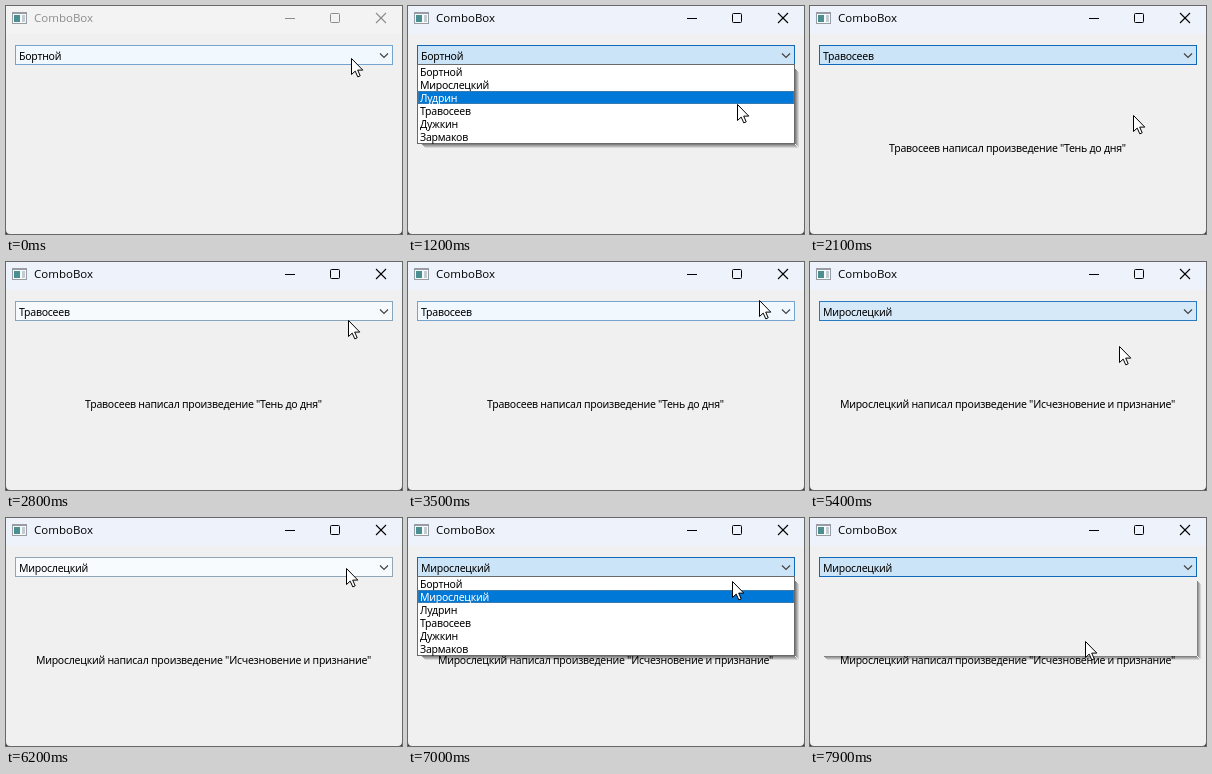
Write an HTML page with a canvas that moves like this. It is 396 by 228 pixels and loops after 8000 ms.

```html
<!DOCTYPE html>
<html lang="ru">
<head>
<meta charset="utf-8">
<title>ComboBox</title>
<style>
html, body { margin: 0; width: 100%; height: 100%; overflow: hidden; background: #f0f0f0; }
canvas { display: block; width: 396px; height: 228px; }
</style>
</head>
<body>
<canvas id="stage" width="396" height="228"></canvas>
<script>
const ctx = document.getElementById('stage').getContext('2d');
const W = 396, H = 228, LOOP = 8000, STEP = 100;
const UI_FONT = '10.5px "Noto Sans", "Open Sans", sans-serif';
const TITLE_FONT = '11.5px "Open Sans", "Noto Sans", sans-serif';
const ROW = 13, LIST_TOP = 59;
const BODY = '#f0f0f0';

const authors = ['Бортной', 'Мирослецкий', 'Лудрин', 'Травосеев', 'Дужкин', 'Зармаков'];
const works = { 1: 'Исчезновение и признание', 3: 'Тень до дня' };

// each use of the box: pressed, list closed, chosen row
const uses = [
  { press: -2000, pick: -1400, row: 0 },
  { press: 400, pick: 2100, row: 3 },
  { press: 4400, pick: 5100, row: 1 },
  { press: 6400, pick: 7900, row: 1 }
];

// time, x, y where the pointer turns or rests
const turns = [
  [0, 345, 52], [500, 349, 56], [1500, 323, 109], [2300, 323, 109], [2900, 344, 54],
  [3600, 351, 37], [4400, 349, 44], [4900, 309, 84], [5400, 309, 84], [6100, 340, 50],
  [6400, 340, 50], [6700, 338, 17], [7000, 324, 63], [7700, 275, 123]
];

// normal, hovered, pressed
const fills = [[253, 253, 253], [239, 247, 254], [204, 228, 247]];
const edges = [[165, 165, 165], [106, 164, 214], [15, 104, 184]];

const clamp = u => Math.min(1, Math.max(0, u));
const smooth = u => u * u * (3 - 2 * u);
const mix = (a, b, u) => a + (b - a) * u;

function pointerAt(t) {
  const next = turns.findIndex(([time]) => time > t);
  if (next < 1) return turns[next < 0 ? turns.length - 1 : 0].slice(1);
  const [t0, x0, y0] = turns[next - 1], [t1, x1, y1] = turns[next];
  const u = smooth((t - t0) / (t1 - t0));
  return [mix(x0, x1, u), mix(y0, y1, u)];
}

// 0 normal, 1 hovered, 2 pressed
function comboLevel(t, { press, pick }) {
  const since = t - pick;
  if (since < 0) return 1 + clamp((t - press) / 200);
  const released = 2 * (1 - clamp(since / 800) ** 2);
  return Math.max(released, clamp((since - 900) / 600));
}

function shade(stops, level) {
  const i = Math.min(Math.floor(level), stops.length - 2);
  return `rgb(${stops[i].map((v, c) => Math.round(mix(v, stops[i + 1][c], level - i)))})`;
}

function rect(color, x, y, w, h) {
  ctx.fillStyle = color;
  ctx.fillRect(x, y, w, h);
}

function frame(color, x, y, w, h) {
  ctx.strokeStyle = color;
  ctx.lineWidth = 1;
  ctx.strokeRect(x + 0.5, y + 0.5, w - 1, h - 1);
}

function line(color, width, ...points) {
  ctx.strokeStyle = color;
  ctx.lineWidth = width;
  ctx.beginPath();
  points.forEach(([x, y]) => ctx.lineTo(x, y));
  ctx.stroke();
}

function text(str, x, y, color = '#000', align = 'left', font = UI_FONT) {
  ctx.font = font;
  ctx.letterSpacing = font === UI_FONT ? '-0.25px' : '0px';
  ctx.textAlign = align;
  ctx.fillStyle = color;
  ctx.fillText(str, x, y);
}

function drawWindow(active) {
  const ink = active ? '#000' : '#8c8c8c';
  rect(BODY, 0, 0, W, H);
  rect(active ? '#eef3fb' : '#f3f3f3', 0, 0, W, 28);

  rect('#979da2', 6, 6, 15, 12);
  rect('#f7f8f8', 7, 8, 13, 9);
  rect('#4b8f93', 8, 9, 6, 7);
  rect('#c3ccd2', 16, 9, 3, 7);

  text('ComboBox', 28, 16, ink, 'left', TITLE_FONT);
  line(ink, 1, [279, 12.5], [289, 12.5]);
  ctx.beginPath();
  ctx.roundRect(324.5, 7.5, 9, 9, 1);
  ctx.stroke();
  line(ink, 1.1, [370, 7], [380, 17]);
  line(ink, 1.1, [380, 7], [370, 17]);
}

function drawCombo(level, name) {
  rect(shade(fills, level), 9, 39, 378, 20);
  frame(shade(edges, level), 9, 39, 378, 20);
  text(name, 13, 54);
  line('#444', 1.2, [374, 47.5], [378, 51.5], [382, 47.5]);
}

function drawShadow() {
  for (let i = 0; i < 4; i++) {
    const color = `rgba(0,0,0,${0.46 * (1 - i / 4)})`;
    rect(color, 387 + i, 63 + i, 1, 75);
    rect(color, 14 + i, 138 + i, 373, 1);
  }
}

function drawList(hovered) {
  drawShadow();
  rect('#fff', 9, 58, 378, 80);
  frame('#6a6a6a', 9, 58, 378, 80);
  authors.forEach((name, i) => {
    const top = LIST_TOP + ROW * i;
    if (i === hovered) {
      rect('#0078d7', 10, top, 376, ROW);
      ctx.setLineDash([1, 1]);
      frame('rgba(255,135,40,.45)', 10, top, 376, ROW);
      ctx.setLineDash([]);
    }
    text(name, 12, top + 11, i === hovered ? '#fff' : '#000');
  });
}

function drawPointer([x, y]) {
  ctx.save();
  ctx.translate(Math.round(x) + 0.5, Math.round(y) + 0.5);
  const arrow = new Path2D('M0 0V16L3.7 12.6 6.3 18.4 8.7 17.3 6.2 11.6H11.3Z');
  ctx.fillStyle = '#fff';
  ctx.fill(arrow);
  ctx.strokeStyle = '#000';
  ctx.lineWidth = 1;
  ctx.stroke(arrow);
  ctx.restore();
}

// bottom window corners
function drawCorners() {
  ctx.fillStyle = '#3c3c3c';
  for (const [x, dir] of [[0, 1], [W, -1]]) {
    ctx.beginPath();
    ctx.moveTo(x, H - 4);
    ctx.quadraticCurveTo(x, H, x + dir * 4, H);
    ctx.lineTo(x, H);
    ctx.fill();
  }
}

// the highlight trails the pointer by one step
function hoveredRow(t, current) {
  const row = Math.floor((pointerAt(t - STEP)[1] - LIST_TOP) / ROW);
  return row in authors ? row : current;
}

function draw(t) {
  const use = uses.findLast(u => u.press <= t);
  const current = uses.findLast(u => u.pick <= t).row;
  drawWindow(t >= uses[1].press);
  drawCombo(comboLevel(t, use), authors[current]);
  if (works[current]) {
    text(`${authors[current]} написал произведение "${works[current]}"`, 197.5, 146, '#000', 'center');
  }
  if (t > use.press && t < use.pick) {
    drawList(hoveredRow(t, current));
  } else if (t >= uses.at(-1).pick) {
    // the shadow outlives the list
    rect(BODY, 9, 59, 378, 79);
    drawShadow();
  }
  drawCorners();
  drawPointer(pointerAt(t));
}

function tick() {
  draw(Math.floor((performance.now() % LOOP) / STEP) * STEP);
  requestAnimationFrame(tick);
}
tick();
</script>
</body>
</html>
```
